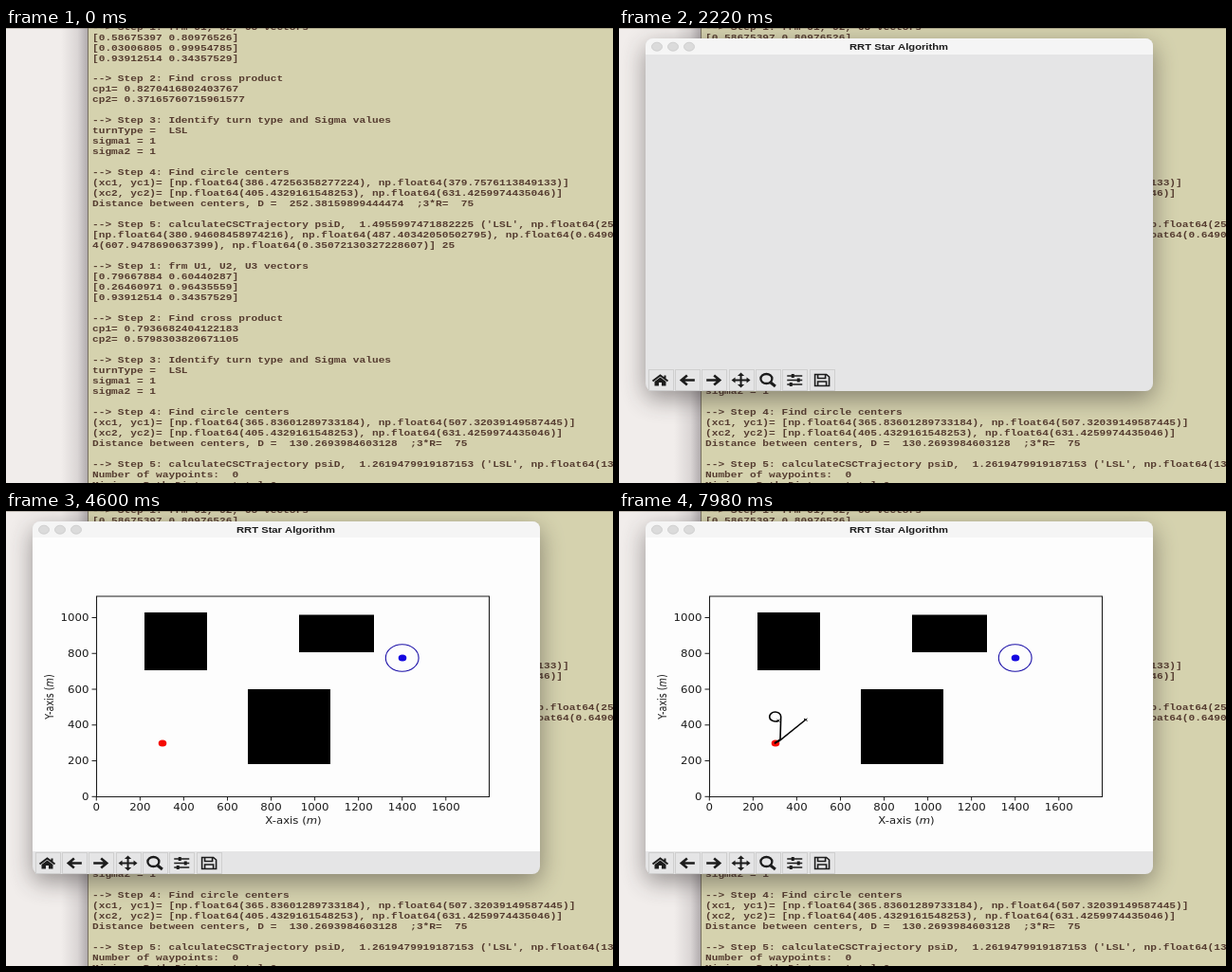
These frames come from a looping animation (640x480 px, 8000 ms). An HTML page with a canvas:

```html
<!DOCTYPE html>
<html lang="en">
<head>
<meta charset="utf-8">
<title>RRT Star Algorithm</title>
<style>
  html, body { margin: 0; width: 100%; height: 100%; overflow: hidden; background: #d5d2ae; }
  canvas { display: block; }
</style>
</head>
<body>
<canvas id="stage" width="640" height="480"></canvas>
<script>
const ctx = document.getElementById('stage').getContext('2d');
const LOOP = 8000;
const WINDOW_AT = 1540, PLOT_AT = 2700, FIRST_EDGE_AT = 6960, SECOND_EDGE_AT = 7520;
const ASPECT = 1.22;
const INK = '#553c30';
const DARK = '#1c1c1c';

const LOG = `--> Step 1: frm U1, U2, U3 vectors
[0.58675397 0.80976526]
[0.03006805 0.99954785]
[0.93912514 0.34357529]

--> Step 2: Find cross product
cp1= 0.8270416802403767
cp2= 0.37165760715961577

--> Step 3: Identify turn type and Sigma values
turnType =  LSL
sigma1 = 1
sigma2 = 1

--> Step 4: Find circle centers
(xc1, yc1)= [np.float64(386.47256358277224), np.float64(379.7576113849133)]
(xc2, yc2)= [np.float64(405.4329161548253), np.float64(631.4259974435046)]
Distance between centers, D =  252.38159899444474  ;3*R=  75

--> Step 5: calculateCSCTrajectory psiD,  1.4955997471882225 ('LSL', np.float64(25
[np.float64(380.94608458974216), np.float64(487.40342050502795), np.float64(0.6490
4(607.9478690637399), np.float64(0.35072130327228607)] 25

--> Step 1: frm U1, U2, U3 vectors
[0.79667884 0.60440287]
[0.26460971 0.96435559]
[0.93912514 0.34357529]

--> Step 2: Find cross product
cp1= 0.7936682404122183
cp2= 0.5798303820671105

--> Step 3: Identify turn type and Sigma values
turnType =  LSL
sigma1 = 1
sigma2 = 1

--> Step 4: Find circle centers
(xc1, yc1)= [np.float64(365.83601289733184), np.float64(507.32039149587445)]
(xc2, yc2)= [np.float64(405.4329161548253), np.float64(631.4259974435046)]
Distance between centers, D =  130.2693984603128  ;3*R=  75

--> Step 5: calculateCSCTrajectory psiD,  1.2619479919187153 ('LSL', np.float64(13
Number of waypoints:  0
Minimum Path Distance total 0`.split('\n');

function rect(x, y, w, h, color) {
  ctx.fillStyle = color;
  ctx.fillRect(x, y, w, h);
}

function ellipse(x, y, rx, ry) {
  ctx.beginPath();
  ctx.ellipse(x, y, rx, ry, 0, 0, 2 * Math.PI);
}

function dot(x, y, rx, ry, color) {
  ellipse(x, y, rx, ry);
  ctx.fillStyle = color;
  ctx.fill();
}

function stroke(path, width, color = DARK) {
  ctx.strokeStyle = color;
  ctx.lineWidth = width;
  ctx.stroke(new Path2D(path));
}

function text(str, x, y, font, align = 'left', color = DARK) {
  ctx.save();
  ctx.translate(x, y);
  ctx.scale(ASPECT, 1);
  ctx.font = font;
  ctx.textAlign = align;
  ctx.fillStyle = color;
  ctx.fillText(str, 0, 0);
  ctx.restore();
}

function axisLabel(letter, x, y, angle) {
  const parts = [[`${letter}-axis (`, ''], ['m', 'italic '], [')', '']];
  const font = style => `${style}9.6px "DejaVu Sans", sans-serif`;
  ctx.save();
  ctx.translate(x, y);
  ctx.scale(ASPECT, 1);
  ctx.rotate(angle);
  ctx.textAlign = 'left';
  ctx.fillStyle = DARK;
  const widths = parts.map(([str, style]) => {
    ctx.font = font(style);
    return ctx.measureText(str).width;
  });
  let left = -widths.reduce((a, b) => a + b) / 2;
  parts.forEach(([str, style], i) => {
    ctx.font = font(style);
    ctx.fillText(str, left, 0);
    left += widths[i];
  });
  ctx.restore();
}

function drawTerminal() {
  rect(0, 0, 87, 480, '#f1edeb');
  const shade = ctx.createLinearGradient(58, 0, 87, 0);
  shade.addColorStop(0, 'rgba(80,72,80,0)');
  shade.addColorStop(0.6, 'rgba(80,72,80,.14)');
  shade.addColorStop(1, 'rgba(80,72,80,.42)');
  rect(58, 0, 29, 480, shade);
  rect(87, 0, 553, 480, '#d5d2ae');
  rect(86, 0, 1, 480, '#77705f');
  rect(0, 0, 640, 1, 'rgba(100,90,75,.35)');
  LOG.forEach((line, i) =>
    text(line, 91, 1.6 + i * 10.976, 'bold 9.16px "Liberation Mono", monospace', 'left', INK));
}

const ICONS = [
  () => { // home
    stroke('M-8 1 L0 -5 L8 1 M5 -5 V-2', 2);
    ctx.fill(new Path2D('M-6 1.5 L0 -3 L6 1.5 V6 H1.5 V2.5 H-1.5 V6 H-6Z'));
  },
  () => stroke('M8 0 H-6 M0 -5 L-6 0 L0 5', 2.6),
  () => stroke('M-8 0 H6 M0 -5 L6 0 L0 5', 2.6),
  () => { // pan
    stroke('M-7 0 H7 M0 -6 V6', 2);
    ctx.fill(new Path2D('M-10 0 l4 -3 v6z M10 0 l-4 -3 v6z M0 -8 l-3.6 3.6 h7.2z M0 8 l-3.6 -3.6 h7.2z'));
  },
  () => { // zoom
    ellipse(-1.5, -1.5, 6, 5);
    ctx.lineWidth = 2.3;
    ctx.stroke();
    stroke('M3 2.5 L8 6.5', 3);
  },
  () => { // sliders
    stroke('M-8 -4.5 H8 M-8 0 H8 M-8 4.5 H8', 1.5);
    stroke('M-2 -6.5 V-2.5 M4 -2 V2 M-4 2.5 V6.5', 3);
  },
  () => { // save
    stroke('M-7 -6 H5 L8 -3.5 V6 H-7Z M-4 -6 V-2 H4 V-6 M-4 6 V1.5 H5 V6', 1.6);
  }
];

function drawToolbar() {
  ICONS.forEach((icon, i) => {
    const x = 43.5 + i * 28.35;
    ctx.strokeStyle = '#cfcfcf';
    ctx.lineWidth = 1;
    ctx.strokeRect(Math.round(x - 13) + .5, 360.5, 26, 22);
    ctx.save();
    ctx.translate(x, 371.5);
    ctx.strokeStyle = ctx.fillStyle = DARK;
    icon();
    ctx.restore();
  });
}

function drawWindow(plotted) {
  const frame = new Path2D();
  frame.roundRect(28, 11, 535, 372, 8);
  ctx.save();
  ctx.shadowColor = 'rgba(45,40,40,.48)';
  ctx.shadowBlur = 26;
  ctx.shadowOffsetY = 8;
  ctx.fillStyle = '#e5e5e6';
  ctx.fill(frame);
  ctx.restore();

  ctx.save();
  ctx.clip(frame);
  rect(28, 11, 535, 17, '#f5f5f5');
  if (plotted) rect(28, 28, 535, 331, '#fdfdfd');
  ctx.restore();

  for (const x of [40, 57, 74]) {
    dot(x, 19.7, 5.5, 4.5, '#dbdbdb');
    ctx.strokeStyle = '#cacaca';
    ctx.lineWidth = .8;
    ctx.stroke();
  }
  text('RRT Star Algorithm', 295, 22.8, 'bold 9.2px "Liberation Sans", sans-serif', 'center');
  drawToolbar();
}

function drawPlot() {
  const font = '9.65px "DejaVu Sans", sans-serif';
  for (let v = 0; v <= 1600; v += 200) {
    const x = 95.3 + v * .2303;
    stroke(`M${x} 301.5 v4`, 1);
    text(v, x, 316, font, 'center');
  }
  for (let v = 0; v <= 1000; v += 200) {
    const y = 301.3 - v * .1888;
    stroke(`M95 ${y} h-4.5`, 1);
    text(v, 87.5, y + 3.6, font, 'right');
  }
  axisLabel('X', 303, 329.5, 0);
  axisLabel('Y', 49.5, 196, -Math.PI / 2);

  rect(146, 107, 66, 61, '#000');
  rect(309, 109.5, 79, 39.5, '#000');
  rect(255, 188, 87, 79, '#000');
  stroke('M95.5 90 H509.5 V301.5 H95.5Z', 1.1);

  dot(165, 245, 4.3, 3.5, '#f50a00');
  dot(418, 155, 4.3, 3.5, '#1407e0');
  ellipse(417.7, 155, 17.4, 14.3);
  ctx.strokeStyle = '#1b10a8';
  ctx.lineWidth = 1.1;
  ctx.stroke();
}

function drawFirstEdge() {
  stroke('M164 245 L170 241 L170.7 217 A6 5 0 1 0 165 222 L168 221.5', 1.6, '#000');
  stroke('M166.5 220 l3 2.5 m0 -2.5 l-3 2.5', 1, '#000');
}

function drawSecondEdge() {
  stroke('M164 245 L169 242.5 L197 220', 1.6, '#000');
  stroke('M195 219 l3.5 2.5 m0 -2.5 l-3.5 2.5', 1, '#000');
}

function render(t) {
  drawTerminal();
  if (t >= WINDOW_AT) drawWindow(t >= PLOT_AT);
  if (t >= PLOT_AT) drawPlot();
  if (t >= FIRST_EDGE_AT) drawFirstEdge();
  if (t >= SECOND_EDGE_AT) drawSecondEdge();
}

let start;
function animate(now) {
  start ??= now;
  render((now - start) % LOOP);
  requestAnimationFrame(animate);
}
requestAnimationFrame(animate);
</script>
</body>
</html>
```
